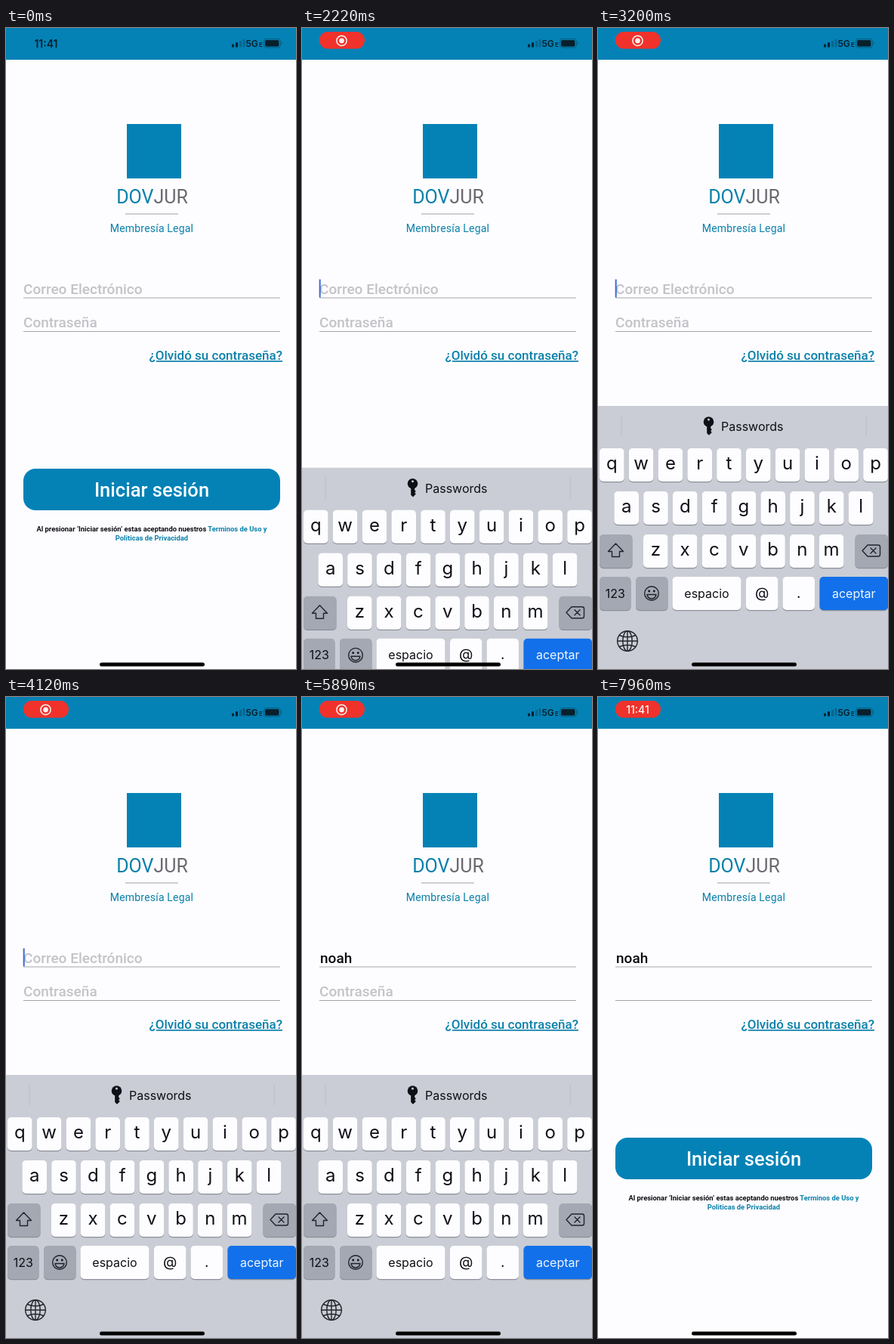
These frames come from a looping animation (384 by 848 pixels, 7990 ms). An HTML page:

```html
<!DOCTYPE html>
<html lang="es">
<head>
<meta charset="utf-8">
<title>Inicio de sesión</title>
<style>
  html, body { margin: 0; width: 100%; height: 100%; overflow: hidden; background: #fdfdff; }
  svg { display: block; width: 100vw; height: 100vh; }
  text { font-family: Roboto, sans-serif; }
  .ui, .ui text { font-family: Inter, sans-serif; }
  .brand { fill: #0482b6; }
  .teal { fill: #0a80aa; }
  .hint { fill: #c3c3c8; font-size: 19px; font-weight: 500; }
  .mid { text-anchor: middle; }
  .line { stroke: #a6a3ab; stroke-width: 1.2; }
  .icon { fill: none; stroke: #23242c; stroke-width: 1.4; stroke-linejoin: round; stroke-linecap: round; }
</style>
</head>
<body>
<svg viewBox="0 0 384 848" preserveAspectRatio="none">
  <rect width="384" height="848" fill="#fdfdff"/>
  <rect class="brand" width="384" height="42"/>

  <g class="ui" fill="#08202c">
    <text id="clock" class="mid" x="53" y="25.5" font-size="14" font-weight="600">11:41</text>
    <g id="pill">
      <rect x="23" y="5" width="60" height="22.5" rx="11.2" fill="#f0322b"/>
      <g id="rec">
        <circle cx="52.5" cy="16.8" r="6.6" fill="none" stroke="#fff4f2" stroke-width="1.5"/>
        <circle cx="52.5" cy="16.8" r="3.4" fill="#fff4f2"/>
      </g>
      <text id="pillClock" class="mid" x="52.5" y="22" font-size="14" font-weight="500" fill="#fff4f2">11:41</text>
    </g>
    <rect x="299" y="21.5" width="3" height="4" rx="1"/>
    <rect x="304" y="19" width="3" height="6.5" rx="1"/>
    <g opacity=".28">
      <rect x="309" y="17" width="3" height="8.5" rx="1"/>
      <rect x="313.5" y="15" width="3" height="10.5" rx="1"/>
    </g>
    <text x="317.5" y="25" font-size="12" font-weight="600">5G</text>
    <text x="335" y="25" font-size="8" font-weight="600">E</text>
    <rect x="341.5" y="14.5" width="22" height="11.5" rx="3.5" fill="none" stroke="#08202c" stroke-opacity=".4"/>
    <rect x="343" y="16" width="18.5" height="8.5" rx="2"/>
    <path d="M365 18.5q2 1.7 0 3.6z" opacity=".45"/>
  </g>

  <rect class="brand" x="160" y="127" width="72" height="72"/>
  <text class="mid" x="193.5" y="232" font-size="25"><tspan class="teal">DOV</tspan><tspan fill="#6c6a70">JUR</tspan></text>
  <path d="M158 246H228" stroke="#a09fa5"/>
  <text class="teal mid" x="193" y="269.5" font-size="14" letter-spacing=".2">Membresía Legal</text>

  <text id="mailHint" class="hint" x="23" y="352">Correo Electrónico</text>
  <text id="mail" x="24" y="352" font-size="19" font-weight="500" fill="#0b0b12"></text>
  <rect id="caret" y="332.5" width="2" height="24" fill="#3f68d2"/>
  <text id="passHint" class="hint" x="23" y="396">Contraseña</text>
  <path class="line" d="M23 357H363M23 401.5H363"/>
  <text class="teal" x="366" y="439" font-size="17" font-weight="500" text-anchor="end" text-decoration="underline">¿Olvidó su contraseña?</text>

  <rect class="brand" x="23" y="583" width="340" height="55" rx="16"/>
  <text class="mid" x="193" y="620" font-size="25.5" font-weight="500" fill="#fbfdff">Iniciar sesión</text>
  <g class="mid" font-size="9.4" font-weight="600">
    <text x="193" y="666" fill="#0b0b12">Al presionar ‘Iniciar sesión’ estas aceptando nuestros <tspan class="teal">Terminos de Uso y</tspan></text>
    <text class="teal" x="193" y="678">Politicas de Privacidad</text>
  </g>

  <g id="keyboard" class="ui" fill="#0f1016">
    <rect y="500" width="384" height="348" fill="#cacdd5"/>
    <path d="M31 513V541M355 513V541" stroke="#b9bec8"/>
    <circle cx="146.5" cy="521" r="6.8"/>
    <path d="M144.2 526h5v3.5l1.6 1.8-1.6 1.8 1.6 1.8-3.8 3.8-2.8-2.6z"/>
    <circle cx="146.5" cy="518" r="1.5" fill="#cacdd5"/>
    <text x="163" y="533" font-size="16">Passwords</text>
    <g id="keys"></g>
    <path class="icon" d="M23.5 682L33.5 692.5H28.5V699.5H18.5V692.5H13.5Z"/>
    <path class="icon" d="M357 684H371Q373.5 684 373.5 686.5V696.5Q373.5 699 371 699H357L350 691.5ZM361 688L368 695M368 688L361 695"/>
    <circle class="icon" cx="71" cy="748" r="9.3"/>
    <circle cx="67.7" cy="745" r="1.4"/><circle cx="74.3" cy="745" r="1.4"/>
    <path class="icon" d="M65 749.5H77Q76 755 71 755Q66 755 65 749.5Z"/>
    <g class="icon">
      <circle cx="39" cy="811" r="13.3"/>
      <ellipse cx="39" cy="811" rx="6.2" ry="13.3"/>
      <path d="M39 797.7V824.3M25.7 811H52.3M28.5 803.5Q39 808 49.5 803.5M28.5 818.5Q39 814 49.5 818.5"/>
    </g>
    <g id="bubbles"></g>
  </g>
  <rect x="124" y="839.5" width="139" height="5" rx="2.5" fill="#030303"/>
</svg>
<script>
const LOOP = 7990, FOCUS = 2070, SECURE = 7520;
const PILL_IN = 600, PILL_CLOCK = 5950;
// key, press, text inserted, bubble gone
const PRESSES = [
  ['n', 4420, 4510, 4590],
  ['o', 4710, 4810, 4900],
  ['a', 4830, 4920, 5000],
  ['h', 5160, 5250, 5330]
];
const KEY_W = 32.6, KEY_H = 44, PITCH = 38.8;

const $ = id => document.getElementById(id);
const show = (el, on) => el.setAttribute('visibility', on ? 'inherit' : 'hidden');
const clamp = v => Math.max(0, Math.min(1, v));

function add(parent, tag, attrs, label) {
  const el = document.createElementNS('http://www.w3.org/2000/svg', tag);
  for (const k in attrs) el.setAttribute(k, attrs[k]);
  if (label) el.textContent = label;
  return parent.appendChild(el);
}

function addKey(x, y, w, label, size, fill = '#fdfdff', ink = '#0f1016') {
  const box = { x, y, width: w, height: KEY_H, rx: 5 };
  add($('keys'), 'rect', { ...box, y: y + 1.2, fill: '#8d9099' });
  add($('keys'), 'rect', { ...box, fill });
  const base = y + (size > 20 ? 28 : 27.5);
  add($('keys'), 'text', { x: x + w / 2, y: base, class: 'mid', 'font-size': size, fill: ink }, label);
}

const places = {};
[['qwertyuiop', 2, 556], ['asdfghjkl', 21.4, 613], ['zxcvbnm', 60, 670]].forEach(([row, left, y]) =>
  [...row].forEach((c, i) => {
    places[c] = [left + i * PITCH, y];
    addKey(left + i * PITCH, y, KEY_W, c, 24);
  }));
const GRAY = '#a3a8b3';
addKey(2, 670, 43.5, '', 16, GRAY);
addKey(340.5, 670, 43.5, '', 16, GRAY);
addKey(2, 726, 41.5, '123', 16, GRAY);
addKey(50, 726, 42.5, '', 16, GRAY);
addKey(98.5, 726, 91, 'espacio', 16);
addKey(196, 726, 42.5, '@', 19);
addKey(244.5, 726, 42.5, '.', 19);
addKey(293.5, 726, 90.5, 'aceptar', 16, '#1270ea', '#f0f6ff');

function addBubble(c) {
  const [x, y] = places[c], r = x + KEY_W, b = y + KEY_H;
  const L = x - 13.5, R = r + 13.5, T = y - 69, S = y - 20;
  const g = add($('bubbles'), 'g', {});
  const d = `M${L + 9} ${T}H${R - 9}Q${R} ${T} ${R} ${T + 9}V${S}`
    + `C${R} ${S + 15} ${r} ${S + 14} ${r} ${S + 28}V${b - 5}Q${r} ${b} ${r - 5} ${b}`
    + `H${x + 5}Q${x} ${b} ${x} ${b - 5}V${S + 28}C${x} ${S + 14} ${L} ${S + 15} ${L} ${S}V${T + 9}Q${L} ${T} ${L + 9} ${T}Z`;
  add(g, 'path', { d, fill: '#fdfdff', stroke: '#c0c3cc', 'stroke-width': 0.8 });
  add(g, 'text', { x: x + KEY_W / 2 - 0.8, y: y - 26.5, class: 'mid', 'font-size': 36 }, c);
  return g;
}
const bubbles = PRESSES.map(([c]) => addBubble(c));

// Critically damped rise, as a fraction still hidden
function hiddenPart(ms) {
  if (ms <= 0) return 1;
  const x = ms * 0.0184;
  return (1 + x) * Math.exp(-x);
}

function draw(t) {
  const secure = t >= SECURE;
  const focused = t >= FOCUS && !secure;

  const pill = clamp((t - PILL_IN) / 180);
  $('pill').setAttribute('opacity', pill);
  $('clock').setAttribute('opacity', 1 - pill);
  const swap = clamp((t - PILL_CLOCK) / 200);
  $('rec').setAttribute('opacity', 1 - swap);
  $('pillClock').setAttribute('opacity', swap);

  const drop = 348 * hiddenPart(t - FOCUS);
  $('keyboard').setAttribute('transform', `translate(0 ${drop.toFixed(2)})`);
  show($('keyboard'), focused);

  const typed = PRESSES.filter(p => t >= p[2]);
  $('mail').textContent = typed.map(p => p[0]).join('');
  show($('mailHint'), !typed.length);
  show($('passHint'), !secure);
  PRESSES.forEach((p, i) => show(bubbles[i], focused && t >= p[1] && t < p[3]));

  const since = t - (typed.length ? typed[typed.length - 1][2] : FOCUS);
  show($('caret'), focused && since % 1000 < 600);
  $('caret').setAttribute('x', typed.length ? 24.5 + $('mail').getComputedTextLength() : 22.7);
}

const start = performance.now();
function tick() {
  draw((performance.now() - start) % LOOP);
  requestAnimationFrame(tick);
}
tick();
</script>
</body>
</html>
```
